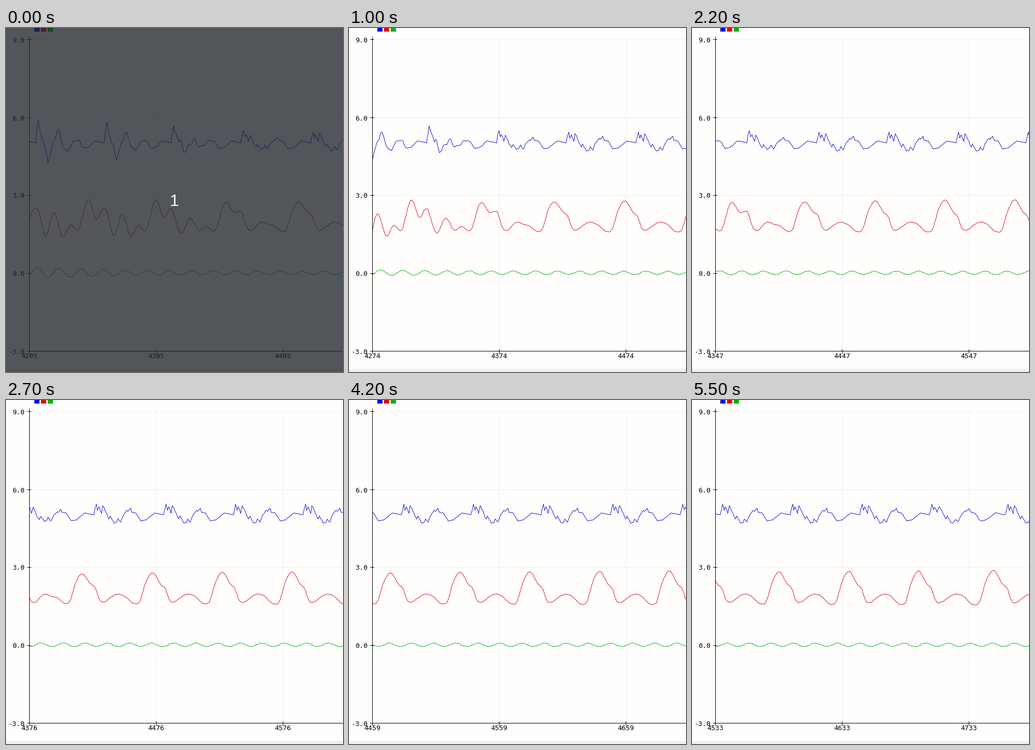
These frames come from a looping animation (654 by 669 pixels, 5600 ms). A matplotlib script:

```python
import numpy as np
import matplotlib.pyplot as plt
from matplotlib.animation import FuncAnimation
from matplotlib.patches import Rectangle

W, H, DPI = 654, 669, 100
PX = 72 / DPI
LEFT, BOTTOM, STEP = 45, 628, 2.46   # STEP: pixels per sample
START, END = 4205, 4784
TICK_MS, LOOP_MS = 100, 5600
BLUE, RED, GREEN = "#0000ff", "#f00000", "#00b400"

# Moments (ms) when the plot scrolls, and first samples at some of the updates
TIMES = [0, 300, 700, 1000, 1200, 1500, 1700, 2000, 2200, 2500, 2700,
         3000, 3200, 3400, 3700, 3900, 4200, 4400, 4600, 4900, 5200, 5500]
SCROLL = [(0, 4205), (1, 4232), (2, 4260), (5, 4303), (10, 4376),
          (13, 4418), (16, 4459), (21, 4533)]

# Heartbeats: start samples, and (sample, y) key points of one beat.
# The signal settles from the rough shape into the calm one.
PERIOD = 55
BEATS = np.array([4157, 4212, 4266, *range(4319, 4705, PERIOD), 4764, 4819])
BLUE_ROUGH = [(0, 179), (2, 203), (4, 222), (6, 232), (8, 264), (10, 243),
              (12, 222), (14, 213), (16, 192), (18, 211), (20, 231), (24, 241),
              (28, 220), (33, 217), (36, 233), (41, 231), (45, 219), (53, 223)]
BLUE_CALM = [(0, 202), (1, 214), (2, 207), (4, 220), (5, 205), (6, 209),
             (10, 231), (11, 225), (14, 239), (16, 238), (17, 231), (19, 237),
             (21, 224), (24, 214), (25, 216), (27, 210), (28, 218), (31, 219),
             (35, 235), (39, 233), (46, 219), (53, 223)]
RED_ROUGH = [(0, 352), (6, 407), (12.5, 357), (20, 409), (26, 383), (32, 394),
             (40.5, 330), (47, 372), (52, 349)]
RED_CALM = [(0, 370), (2, 385), (7, 391), (10, 386), (17, 377), (22, 380),
            (30, 395), (34, 392), (39, 355), (44, 336), (51, 359)]


def jagged(keys, t):
    x, y = np.array(keys).T
    return np.interp(t, x, y, period=PERIOD)


def smooth(keys, t):
    """Periodic cubic Hermite curve through the key points."""
    x, y = np.array(keys, float).T
    x, y = np.r_[x - PERIOD, x, x + PERIOD], np.tile(y, 3)
    slope = np.gradient(y, x)
    i = np.searchsorted(x, t, side="right") - 1
    h = x[i + 1] - x[i]
    u = (t - x[i]) / h
    ease = u * u * (3 - 2 * u)
    return (y[i] * (1 - ease) + y[i + 1] * ease
            + h * u * (1 - u) * (slope[i] * (1 - u) - slope[i + 1] * u))


def make_waves():
    n = np.arange(START, END)
    beat = np.searchsorted(BEATS, n, side="right") - 1
    t = (n - BEATS[beat]) * PERIOD / np.diff(BEATS)[beat]
    rough = 1 / (1 + np.exp(2 * (beat - 3)))

    blue = (rough * jagged(BLUE_ROUGH, t)
            + (1 - rough) * jagged(BLUE_CALM, t))
    red = rough * smooth(RED_ROUGH, t) + (1 - rough) * smooth(RED_CALM, t)
    red = 376 + (red - 376) * (1 + 0.02 * (beat - 4))
    age = n - START
    green = 475.7 - (3.3 + 8 * np.exp(-age / 60)) * np.cos(
        2 * np.pi * (age - 6) / 17.44)
    return blue, red, green


fig = plt.figure(figsize=(W / DPI, H / DPI), dpi=DPI, facecolor="#fffefd")
ax = fig.add_axes([0, 0, 1, 1])
ax.set(xlim=(0, W), ylim=(H, 0))
ax.axis("off")


def box(x, y, w, h, color, **kw):
    return ax.add_patch(Rectangle((x, y), w, h, fc=color, lw=0, aa=False, **kw))


def seg(xs, ys, color, z):
    # Half-pixel centres keep one-pixel lines crisp
    ax.plot(np.add(xs, 0.5), np.add(ys, 0.5), color=color, lw=PX, zorder=z,
            snap=False, solid_capstyle="projecting")


def label(x, y, s, ha):
    return ax.text(x, y, s, ha=ha, va="baseline", color="black", zorder=4,
                   family="DejaVu Sans Mono", size=13.3 * PX)


box(0, 663, W, 6, "#f0efee")
for x, color in zip((55, 68, 81), (BLUE, RED, GREEN)):
    box(x, 0, 10, 7, color)

for value, y in zip((9, 6, 3, 0, -3), (22, 174, 325, 477, BOTTOM)):
    if value > -3:
        seg([LEFT, W], [y, y], "#eeeeee", 1)
    seg([41, 48], [y, y], "black", 3)
    label(36.5, y + 5.5, f"{value:.1f}", "right")

COLS = (LEFT, 291, 537)
for x in COLS:
    seg([x, x], [22, BOTTOM], "#eeeeee", 1)
    seg([x, x], [625, 632], "black", 3)
seg([LEFT, LEFT], [17, BOTTOM], "black", 3)
seg([LEFT, W], [BOTTOM, BOTTOM], "black", 3)
ticks = [label(x + 0.5, 642, "", "center") for x in COLS]

window = Rectangle((LEFT, 0), W - LEFT, H, transform=ax.transData)
waves = []
for wave, color in zip(make_waves(), ("#0000d0", "#d80010", "#00ac00")):
    line, = ax.plot([], [], color=color, lw=0.9 * PX, zorder=2, snap=False)
    line.set_clip_path(window)
    waves.append((line, np.round(wave) + 0.5))

shade = box(0, 0, W, H, (0.127, 0.145, 0.172, 0.777), zorder=8)
count = ax.text(326, 346, "1", ha="center", va="baseline", color="white",
                family="Liberation Sans", size=32 * PX, zorder=9)


def draw(i):
    now = i * TICK_MS
    update = np.searchsorted(TIMES, now, side="right") - 1
    first = int(round(np.interp(update, *np.transpose(SCROLL))))
    xs = LEFT + 0.5 + np.floor((np.arange(START, END) - first) * STEP)
    for line, ys in waves:
        line.set_data(xs, ys)
    for k, tick in enumerate(ticks):
        tick.set_text(str(first + 100 * k))
    for part in (shade, count):
        part.set_visible(now < TIMES[1])
    return []


anim = FuncAnimation(fig, draw, frames=LOOP_MS // TICK_MS, interval=TICK_MS,
                     repeat=True, repeat_delay=0)
plt.show()
```
